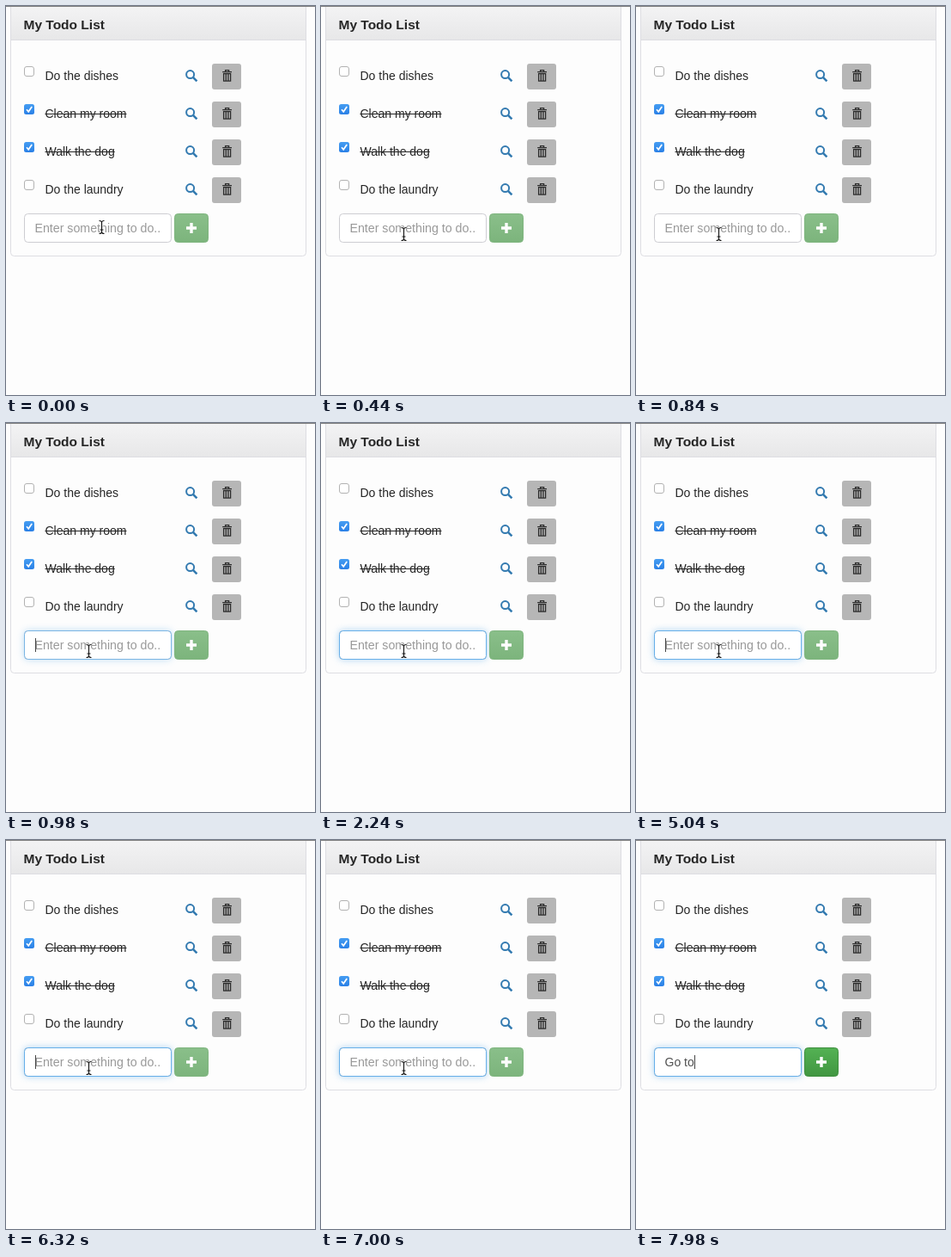
An HTML page with a canvas for the animation above (8000 ms loop, 360x452 px).

```html
<!DOCTYPE html>
<html lang="en">
<head>
<meta charset="utf-8">
<title>My Todo List</title>
<style>
html, body { margin: 0; width: 100%; height: 100%; overflow: hidden; background: #fdfdfd; }
canvas { display: block; }
</style>
</head>
<body>
<canvas id="stage" width="360" height="452"></canvas>
<script>
const LOOP = 8000;
const FONT = '"Liberation Sans", Arial, sans-serif';
const FOCUS = 860, BLINK_START = 1460, BLINK = 560;
const KEYS = [7200, 7380, 7540, 7680, 7860];
const TYPED = 'Go to';
const ITEMS = [
  ['Do the dishes', false],
  ['Clean my room', true],
  ['Walk the dog', true],
  ['Do the laundry', false]
];
const c = document.getElementById('stage').getContext('2d');

const clamp = v => Math.min(1, Math.max(0, v));
const smooth = v => v * v * (3 - 2 * v);

function box(x, y, w, h, r, fill, stroke) {
  c.beginPath();
  c.roundRect(x, y, w, h, r);
  if (fill) { c.fillStyle = fill; c.fill(); }
  if (stroke) { c.strokeStyle = stroke; c.lineWidth = 1; c.stroke(); }
}

function path(d, color, width) {
  c.strokeStyle = color;
  c.lineWidth = width;
  c.stroke(new Path2D(d));
}

function text(s, x, y, color, font = '14px ') {
  c.font = font + FONT;
  c.fillStyle = color;
  c.fillText(s, x, y);
}

function fade(y, h, top, bottom) {
  const g = c.createLinearGradient(0, y, 0, y + h);
  g.addColorStop(0, top);
  g.addColorStop(1, bottom);
  return g;
}

function at(x, y, draw) {
  c.save();
  c.translate(x, y);
  draw();
  c.restore();
}

function panel() {
  c.fillStyle = '#fdfdfd';
  c.fillRect(0, 0, 360, 452);
  box(5.5, -4.5, 344, 295, 4, null, '#dddde2');
  c.fillStyle = fade(1, 39, '#f3f3f4', '#e7e7e8');
  c.fillRect(6, 0, 343, 39);
  c.fillStyle = '#dddde2';
  c.fillRect(6, 39, 343, 1);
  c.fillStyle = '#808080';
  c.fillRect(0, 0, 360, 1);
  text('My Todo List', 20.5, 27, '#262626', 'bold 15.5px ');
}

function checkbox(done) {
  if (done) {
    box(21, 70, 12, 12, 2.5, fade(70, 12, '#459df2', '#2a80e6'));
    path('M24 76.2 L26.2 78.8 L30.2 73', '#fff', 1.7);
  } else {
    box(21.5, 70.5, 11, 11, 2.5, '#fff', '#b2b2b2');
  }
}

function trash() {
  box(240, 67, 34, 30, 3, '#b6b6b6');
  path('M252.2 76.7 H263 M255.6 76 V74.7 H259.6 V76', '#2b2b2b', 1.3);
  path('M253.6 78.7 H261.6 V87.2 H253.6 Z M256.3 79 V87 M258.9 79 V87', '#2b2b2b', 1.3);
}

function row([label, done], i) {
  at(0, i * 44, () => {
    checkbox(done);
    text(label, 45.5, 86, '#262626');
    if (done) {
      c.fillRect(45.5, 81, c.measureText(label).width, 1);
    }
    c.beginPath();
    c.arc(214.6, 79.6, 4.5, 0, 7);
    c.strokeStyle = '#337ab0';
    c.lineWidth = 2;
    c.stroke();
    path('M217.9 82.9 L222.4 87.4', '#337ab0', 2.6);
    trash();
  });
}

function caretOn(t, typed) {
  if (t < FOCUS) return false;
  const start = typed ? KEYS[typed - 1] : BLINK_START;
  return t < start || Math.floor((t - start) / BLINK) % 2 === 0;
}

function field(t, typed) {
  const glow = smooth(clamp((t - FOCUS) / 170));
  c.save();
  c.shadowColor = `rgba(102,175,233,${0.6 * glow})`;
  c.shadowBlur = 8;
  box(21.5, 241.5, 171, 33, 4, '#fff');
  c.restore();
  box(21.5, 241.5, 171, 33, 4, '#fff', '#cdcdd2');
  c.globalAlpha = glow;
  box(21.5, 241.5, 171, 33, 4, null, '#66afe9');
  c.globalAlpha = 1;

  const value = TYPED.slice(0, typed);
  if (typed) text(value, 33.5, 263, '#505050');
  else text('Enter something to do..', 33.5, 263, '#999', '14.2px ');
  if (caretOn(t, typed)) {
    c.fillStyle = '#444';
    c.fillRect(Math.round(34 + c.measureText(value).width), 250, 1, 16);
  }
}

function addButton(on) {
  const fill = on ? fade(241, 34, '#54b254', '#419641') : fade(241, 34, '#8abf8a', '#7cb47c');
  box(196.5, 241.5, 39, 33, 4, fill, on ? '#3e8f3e' : '#7fb57f');
  path('M210 258 H222 M216 252 V264', '#fdfdfd', 3.4);
}

function pointer(t) {
  const p = smooth(clamp((t - 20) / 380));
  const beam = 'M-3 -7.5 Q0 -7.5 0 -5.5 Q0 -7.5 3 -7.5 M0 -6 V6 M-3 7.5 Q0 7.5 0 5.5 Q0 7.5 3 7.5 M-2 3 H2';
  at(111.5 - 15 * p, 257 + 8 * p, () => {
    path(beam, 'rgba(255,255,255,.6)', 2.4);
    path(beam, '#111', 1.1);
  });
}

function frame(now) {
  const t = now % LOOP;
  const typed = KEYS.filter(k => t >= k).length;
  panel();
  ITEMS.forEach(row);
  field(t, typed);
  addButton(typed > 0);
  if (!typed) pointer(t);
  requestAnimationFrame(frame);
}
requestAnimationFrame(frame);
</script>
</body>
</html>
```
